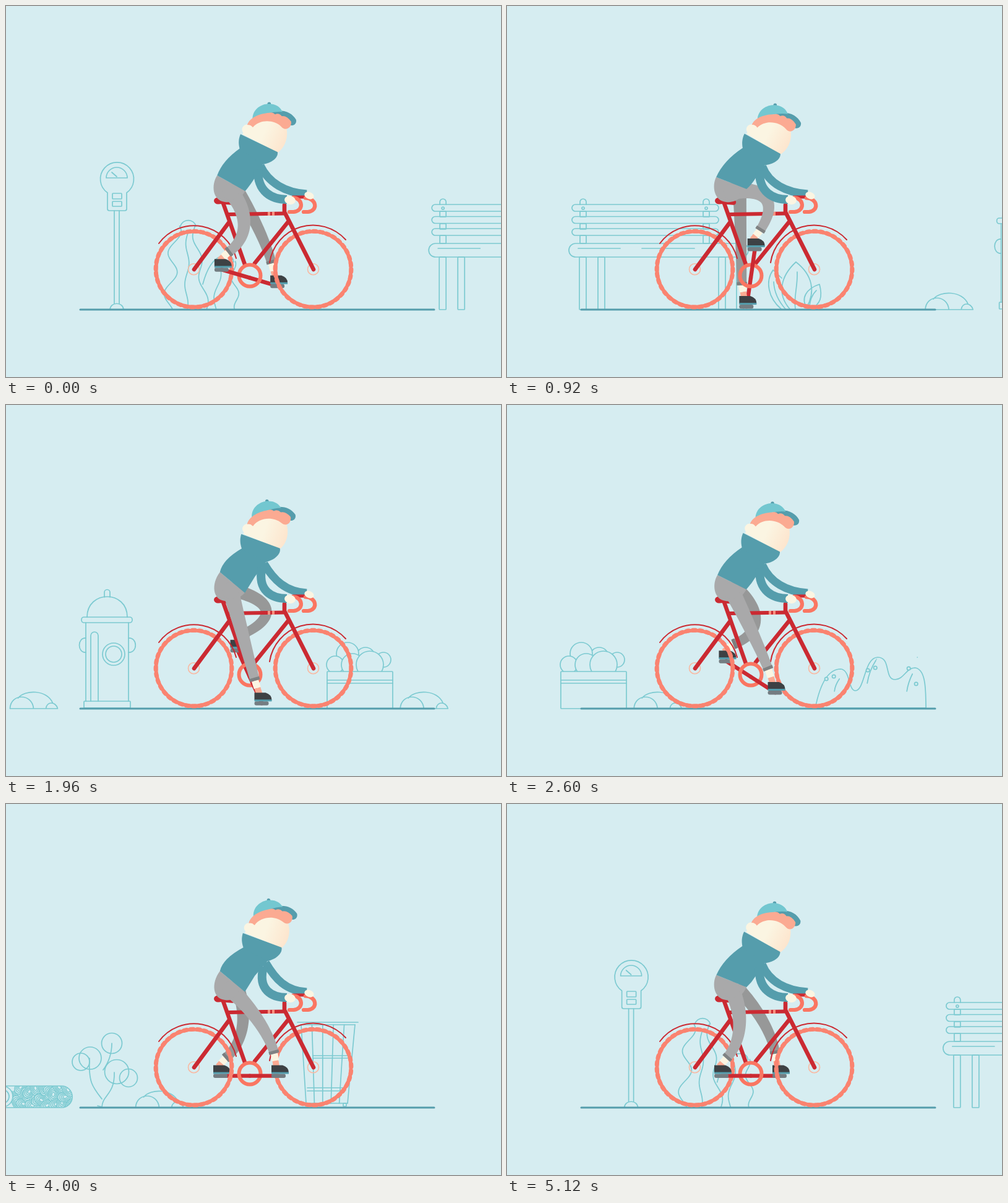
Animation, 800 px wide and 600 px high, one loop 5.16 s. Source, as an HTML page with a canvas:

```html
<!DOCTYPE html>
<html lang="en">
<head>
<meta charset="utf-8">
<title>Cyclist</title>
<style>
html, body { margin: 0; width: 100%; height: 100%; overflow: hidden; background: #d6edf1; }
canvas { display: block; width: 800px; height: 600px; }
</style>
</head>
<body>
<canvas id="stage" width="800" height="600"></canvas>
<script>
const c = document.getElementById('stage').getContext('2d');
const BG = '#d6edf1', LINE = '#7ccad1', TEAL = '#559dac', CAP = '#73c7d0';
const RED = '#cb2a32', CORAL = '#fa7662', TIRE = '#fa8370', PEACH = '#fbaa92';
const CREAM = '#fbf5e2', DARK = '#3d4144', PEDAL = '#747d82';
const LOOP = 5160, STEPS = 154, TURN = 22, STEP = 21.6, GROUND = 491;
const TAU = Math.PI * 2, rad = d => d * Math.PI / 180;
const lerp = (a, b, k) => a + (b - a) * k;

function stroke(d, color, width, cap = 'round') {
  c.strokeStyle = color; c.lineWidth = width; c.lineCap = cap; c.lineJoin = 'round';
  c.stroke(new Path2D(d));
}
function fill(d, color) { c.fillStyle = color; c.fill(new Path2D(d)); }
function disc(x, y, rx, color, ry = rx, turn = 0) {
  c.beginPath(); c.ellipse(x, y, rx, ry, turn, 0, TAU); c.fillStyle = color; c.fill();
}
function ring(x, y, r, color, width) {
  c.beginPath(); c.arc(x, y, r, 0, TAU);
  c.strokeStyle = color; c.lineWidth = width; c.stroke();
}

// ---- scenery ----
const draw = d => stroke(d, LINE, 1.7);
const circle = (x, y, r) => ring(x, y, r, LINE, 1.7);
function ball(x, y, r) { disc(x, y, r, BG); circle(x, y, r); }
function box(x, y, w, h, r = 1) {
  c.beginPath(); c.roundRect(x, y, w, h, r);
  c.strokeStyle = LINE; c.lineWidth = 1.7; c.stroke();
}
// wavy stem from the ground up
function wave(x0, x1, top, amp, phase, len = 66) {
  const p = [];
  for (let y = GROUND; y >= top; y -= 3) {
    const k = (GROUND - y) / (GROUND - top);
    p.push([lerp(x0, x1, k) + amp * Math.sin(TAU * (y - phase) / len), y]);
  }
  draw('M' + p.join('L'));
}

function meter() {
  draw('M164 302A27 27 0 1 1 195 302V328Q195 331 192 331H167Q164 331 164 328Z');
  draw('M162 278A17 17 0 0 1 196 278ZM179 276L171 269');
  box(172, 303, 15, 9); box(172, 316, 15, 8);
  draw('M175 331V481M183 331V481M168 491C169 478 189 478 190 491Z');
}
function cactus() {
  wave(262, 275, 356, 9, 415);
  wave(324, 304, 356, 5, 392);
  wave(291, 294, 366, 3, 400);
  draw('M282 356A13 13 0 0 1 307 356');
  wave(338, 346, 412, 4, 420);
  wave(374, 366, 412, 5, 452, 48);
  draw('M318 450Q328 412 347 405Q366 400 368 414');
}
function bench() {
  for (const x of [118, 317]) {
    draw(`M${x} 321V317A5 5 0 0 1 ${x + 10} 317V321`);
    for (const y of [332, 352, 371]) box(x, y, 10, y > 370 ? 13 : 9);
    circle(x + 5, 327, 2);
  }
  for (let i = 0; i < 3; i++) box(105, 321 + i * 19.5, 237, 11, 5.5);
  box(100, 384, 290, 22, 11);
  draw('M115 392H183M218 392H303');
  for (const x of [117, 147, 342, 371]) box(x, 406, 11, 85);
}
function leaves() {
  draw('M457 490C436 466 442 437 467 414C494 435 499 462 484 488M469 430C470 455 463 470 466 490');
  draw('M443 490C422 472 417 445 430 427L444 440M431 446C432 467 441 480 450 490');
  draw('M486 490C473 473 484 457 505 450C511 473 505 480 494 490M500 460C490 470 490 480 488 490');
}
function rocks() {
  draw('M0 491C1 466 36 466 38 491ZM13 474C24 460 60 460 69 482M58 491C59 479 74 479 77 491ZM38 491H58');
}
function hydrant() {
  draw('M159 311V303A4.500 4.500 0 0 1 168 303V311M131 343C131 299 196 299 196 343');
  box(122, 343, 82, 9, 4);
  draw('M129 352V479M198 352V479M137 479V373A6 6 0 0 1 149 373V479');
  draw('M129 377C115 376 115 401 129 400M198 377C213 376 213 401 198 400');
  circle(174, 403, 18); circle(174, 403, 13); box(126, 479, 75, 11);
}
function crate() {
  c.save();
  c.beginPath(); c.rect(500, 370, 150, 61); c.clip();
  for (let i = 2; i >= 0; i--) ball(552 + 29 * i, 402 + 5 * i, 18 - 3 * i);
  for (let i = 0; i < 3; i++) ball(532 + 28 * i, 420, 14 + 4 * i);
  c.restore();
  box(519, 431, 106, 60);
  draw('M519 445H625M519 450H625');
}
function mounds() {
  draw('M23 490C30 455 42 427 64 427C80 428 76 462 88 462C103 462 102 408 124 408C146 408 134 444 152 444'
    + 'C166 444 170 425 184 425C204 427 201 470 202 490ZM62 443Q55 453 54 463M121 413Q110 430 107 450M180 435Q173 449 171 463');
  for (const [x, y] of [[41, 443], [108, 429], [174, 426]]) {
    ball(x, y, 2.7); ball(x + 14, y - 18 + (y > 430) * 14, 0); ball(x + 12, y + 25 - (x < 150) * 29, 2.7);
  }
}
// wood grain as nested, wobbling ovals
function log() {
  c.save();
  c.beginPath(); c.roundRect(408, 456, 131, 35, 17); c.clip();
  for (let i = 0; i < 20; i++) {
    const x = 446 + i * 4.8, y = 473 + 15 * Math.sin(i * 2.4);
    for (let r = 12; r > 1; r -= 2.8) {
      c.beginPath(); c.ellipse(x, y, r, r * .7, i * 1.1, 0, TAU);
      c.fillStyle = BG; c.fill();
      c.strokeStyle = LINE; c.lineWidth = 1.5; c.stroke();
    }
  }
  for (const r of [17, 11, 5]) ball(426, 473, r);
  c.restore();
  box(408, 456, 131, 35, 17);
}
function tree() {
  for (const [x, y, r] of [[603, 387, 16.5], [568, 411, 18], [553, 417, 14], [611, 433, 19.5], [630, 443, 14.5]]) circle(x, y, r);
  draw('M587 490C588 470 608 470 607 434M587 477C572 458 565 450 567 411M589 430Q603 411 603 387M580 488L587 490');
}
function bin() {
  draw('M471 353H569M477 357H564M485 484H552');
  for (let i = 0; i < 6; i++) draw(`M${477 + 17.4 * i} 357L${485 + 13.4 * i} 484`);
  draw('M496 407H552M496 411H552M487 459H545M487 464H545');
  for (const x of [487, 545]) box(x, 484, 5, 5);
}
// painter and its place along the road, in steps
const props = [
  [meter, 0], [cactus, 0], [bench, 27], [leaves, 27], [rocks, 58.3], [hydrant, 58], [crate, 58],
  [rocks, 87.5], [mounds, 100], [log, 100], [tree, 100], [rocks, 129.7], [bin, 120]
];
function scenery(n) {
  for (const [paint, place] of props) {
    for (const lap of [0, STEPS]) {
      const dx = (place + lap - n) * STEP;
      if (dx > 810 || dx < -800) continue;
      c.save(); c.translate(dx, 0); paint(); c.restore();
    }
  }
}

// ---- bike ----
const HUB = { x: 394, y: 439.6, r: 47 };
const pedalAt = a => [HUB.x + HUB.r * Math.cos(a), HUB.y + HUB.r * Math.sin(a)];

function wheel(x, n) {
  const beads = 36;
  ring(x, 425.7, 9, '#f9b9a2', 1.6);
  ring(x, 425.7, 61, TIRE, 5.8);
  c.save();
  c.translate(x, 425.7); c.rotate(n * STEP / 62);
  c.setLineDash([4, TAU * 61.4 / beads - 4]); c.lineCap = 'round';
  ring(0, 0, 61.4, TIRE, 7);
  c.restore();
}
function bike(n) {
  wheel(303.5, n); wheel(496.5, n);
  stroke('M247 384A70.500 70.500 0 0 1 372 408M426 415A71 71 0 0 1 549 378', RED, 2);
  stroke('M351 319L386 418M361 349L304 426M456 349L402 416M450 322V333L497 426', RED, 6.6);
  stroke('M360 337L450 335.500', RED, 6.2);
  stroke('M423 336H427M430 336H434', '#f9907f', 6.2, 'butt');
  stroke('M342 315.500L366 317.500', RED, 8.5);
  disc(343, 315, 7, RED, 5.5);
}
function bars() {
  stroke('M464 309L482 309', RED, 5);
  stroke('M481 333H488C505 331 502 311 484 310.500M458 333H465C482 331 480 311 464 310', CORAL, 6.2);
}
function crank(a) {
  const [x, y] = pedalAt(a);
  stroke(`M${HUB.x} ${HUB.y}L${x} ${y}`, RED, 6.4);
  c.beginPath(); c.roundRect(x - 12, y - 3, 23, 6.5, 3); c.fillStyle = PEDAL; c.fill();
}

// ---- rider ----
function leg([hx, hy], a, color, cuff, wide) {
  const [px, py] = pedalAt(a);
  const ax = px - 11.5 * Math.cos(a - rad(50)), ay = py - 32 - 5 * Math.cos(a - rad(40));
  const dx = ax - hx, dy = ay - hy, len = Math.hypot(dx, dy);
  // the knee bends most as the pedal nears the top
  const bend = 54 * ((1 + Math.cos(a - rad(258))) / 2) ** 1.7 / len;
  const knee = k => [hx + dx * k + dy * bend, hy + dy * k - dx * bend];
  const P = [[hx, hy], knee(.35), knee(.75), [ax, ay]];
  const point = k => [0, 1].map(i => (1 - k) ** 3 * P[0][i] + 3 * (1 - k) ** 2 * k * P[1][i]
    + 3 * (1 - k) * k * k * P[2][i] + k ** 3 * P[3][i]);

  // ankle and shoe
  const sx = px - 4, sy = py - 15, mx = lerp(ax, sx, .55), my = lerp(ay, sy, .55);
  stroke(`M${mx} ${my}L${sx} ${sy}`, PEACH, 10, 'butt');
  stroke(`M${ax} ${ay}L${mx} ${my}`, CREAM, 11.5, 'butt');
  fill(`M${px - 12} ${py - 5}V${py - 17}H${px + 6}Q${px + 16} ${py - 14} ${px + 16} ${py - 5}Z`, DARK);
  fill(`M${px - 12} ${py - 6}H${px + 16}V${py - 3}H${px - 12}Z`, TEAL);

  // tapered trouser leg
  const left = [], right = [], N = 28;
  for (let i = 0; i <= N; i++) {
    const k = i / N, [x, y] = point(k), [x0, y0] = point(k - .01), [x1, y1] = point(k + .01);
    const s = lerp(wide, 15, k ** .8) / 2 / Math.hypot(x1 - x0, y1 - y0);
    left.push([x + (y1 - y0) * s, y - (x1 - x0) * s]);
    right.unshift([x - (y1 - y0) * s, y + (x1 - x0) * s]);
  }
  fill(`M${left.concat(right).join('L')}Z`, color);
  disc(hx, hy, wide / 2, color);
  const [ex, ey] = point(.95), q = 5 / Math.hypot(ax - ex, ay - ey);
  stroke(`M${lerp(ax, ex, q)} ${lerp(ay, ey, q)}L${ax} ${ay}`, cuff, 16.5, 'butt');
}

// slow sway of the upper body on top of a quick settling at the start
function pose(n) {
  const tilt = -1 + 4.5 * Math.cos(TAU * (n - 27) / 61.5) + 5 * Math.exp(-n / 6);
  const dx = (2.4 + n / 80 + 1.2 * Math.cos(TAU * (n - 27) / 90)) * (1 - Math.exp(-n / 6));
  return { tilt, dx, dy: .3 + tilt * .27, stretch: .3 - tilt * .12 };
}

function head() {
  const skin = c.createLinearGradient(412, 198, 456, 218);
  skin.addColorStop(.15, CREAM); skin.addColorStop(1, '#fde4cc');
  fill('M382 207L439 237C451 229 457 212 453 196C446 178 396 180 390 196Z', skin);
  disc(389.5, 199.5, 8, CREAM);
  fill('M427 172C445 165 462 171 469 184C470 190 466 194 460 193Q448 178 427 174Z', TEAL);
  disc(425.5, 158, 2.8, TEAL);
  fill('M398.500 182C399 166 413 158 425 158C437 158 444 164 447 171Q428 169 398.500 182Z', CAP);
  fill('M390 192C393 182 406 174 426 172.500Q431 171 435 175Q441 172 446 178Q454 177 461 187C462 197 452 203 445 195C434 184 411 182 399 196Q395 191 390 192Z', PEACH);
  fill('M379 207L439 236C440 246 428 254 414 256L378 232C375 222 376 214 379 207Z', TEAL);
}

function render(n) {
  c.fillStyle = BG; c.fillRect(0, 0, 800, 600);
  scenery(n);
  stroke(`M120 ${GROUND}H692`, TEAL, 3);

  const near = Math.PI + (n + 1) * TAU / TURN, far = near + Math.PI;
  const { tilt, dx, dy, stretch } = pose(n);
  const upper = new DOMMatrix().translate(409 + dx, 221 + dy).rotate(tilt).translate(-409, -221);
  const at = (x, y) => { const p = upper.transformPoint({ x, y }); return [p.x, p.y]; };
  const hemL = [339 + 7 * stretch, 276 - 6 * stretch], hemR = [387 - stretch, 297 + 7 * stretch];

  crank(far);
  leg([376, 302], far, '#979898', '#7b7e7f', 22);
  bike(n);
  ring(394, 436, 17.5, CORAL, 6);
  stroke(`M${at(411, 258)}C${at(424, 286)} 452 302 486 304`, TEAL, 13, 'butt');
  bars();
  disc(490, 306.5, 8, CREAM, 5.5, .4);

  crank(near);
  fill(`M${hemL}C331 290 334 315 354 317C372 319 382 307 ${hemR}Z`, '#a9a9aa');
  leg([363, 300], near, '#a9a9aa', '#7f8283', 27);

  fill(`M${at(378, 230)}Q350 250 ${hemL}L${hemR}Q396 288 402 278L${at(416, 254)}L${at(400, 222)}Z`, TEAL);
  stroke(`M${at(407, 264)}C406 301 430 313 454 313`, TEAL, 14, 'butt');
  disc(459, 314, 9, CREAM, 7, .2);

  c.save();
  c.transform(upper.a, upper.b, upper.c, upper.d, upper.e, upper.f);
  head();
  c.restore();
}

const start = performance.now();
function tick(now) {
  const t = Math.max(0, now - start) % LOOP;
  // pictures last 40 ms and sample a 30 per second motion
  render(Math.floor(Math.floor(t / 40) * 6 / 5));
  requestAnimationFrame(tick);
}
render(0);
requestAnimationFrame(tick);
</script>
</body>
</html>
```
